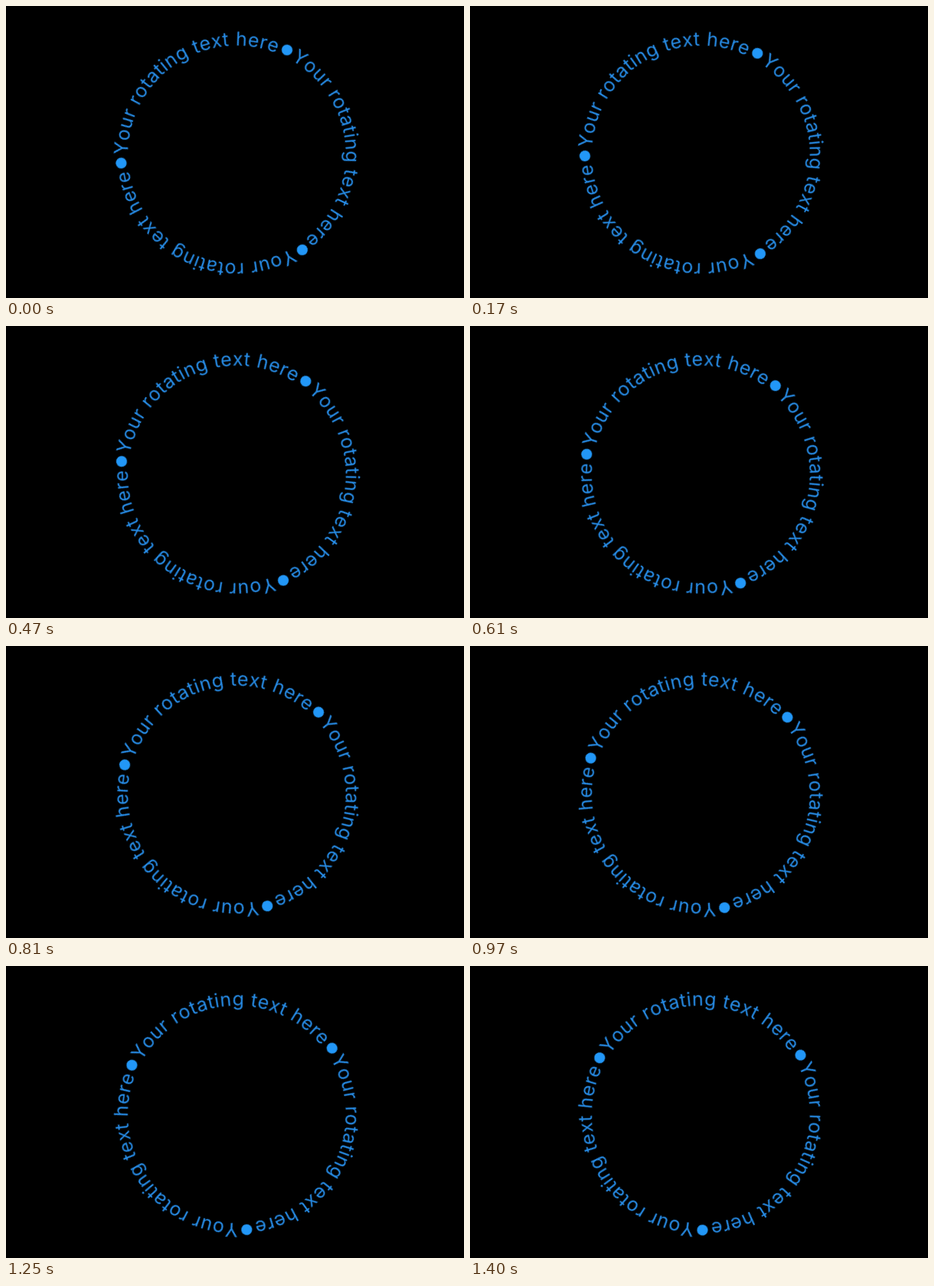
An HTML page that plays this animation: 598x382 px, repeating every 1450 ms.

```html
<!DOCTYPE html>
<html lang="en">
<head>
<meta charset="utf-8">
<title>Rotating text</title>
<style>
  html, body {
    margin: 0;
    width: 100%;
    height: 100%;
    overflow: hidden;
    background: #000;
  }
  svg {
    display: block;
    width: 598px;
    height: 382px;
    fill: #2297f7;
    font: 400 25px Inter, sans-serif;
    font-optical-sizing: none;
    font-kerning: none;
    letter-spacing: 0.48px;
    text-rendering: geometricPrecision;
  }
  text {
    fill: #278ce6;
    text-anchor: middle;
  }
  #ring {
    transform-origin: 0 0;
    animation: spin 1450ms infinite;
  }
  /* The ring advances in short ticks of about 28 ms, then jumps back. */
  @keyframes spin {
    0%      { transform: rotate(25.65deg); animation-timing-function: steps(6); }
    11.72%  { transform: rotate(29.2deg);  animation-timing-function: steps(7); }
    24.82%  { transform: rotate(33.53deg); animation-timing-function: steps(9); }
    42.06%  { transform: rotate(40deg);    animation-timing-function: steps(7); }
    55.86%  { transform: rotate(44.77deg); animation-timing-function: steps(11); }
    76.55%  { transform: rotate(52.42deg); animation-timing-function: steps(10); }
    96.55%, 100% { transform: rotate(59.22deg); }
  }
</style>
</head>
<body>
<svg viewBox="0 0 598 382">
  <defs>
    <path id="arc" d="M0 -142.3A142.3 142.3 0 0 1 123.24 71.15"/>
  </defs>
  <g transform="translate(301.4 194.1)">
    <g id="ring">
      <g id="part">
        <circle cy="-151.4" r="7.1"/>
        <text><textPath href="#arc" startOffset="50%">Your rotating text here</textPath></text>
      </g>
      <use href="#part" transform="rotate(120)"/>
      <use href="#part" transform="rotate(240)"/>
    </g>
  </g>
</svg>
</body>
</html>
```
